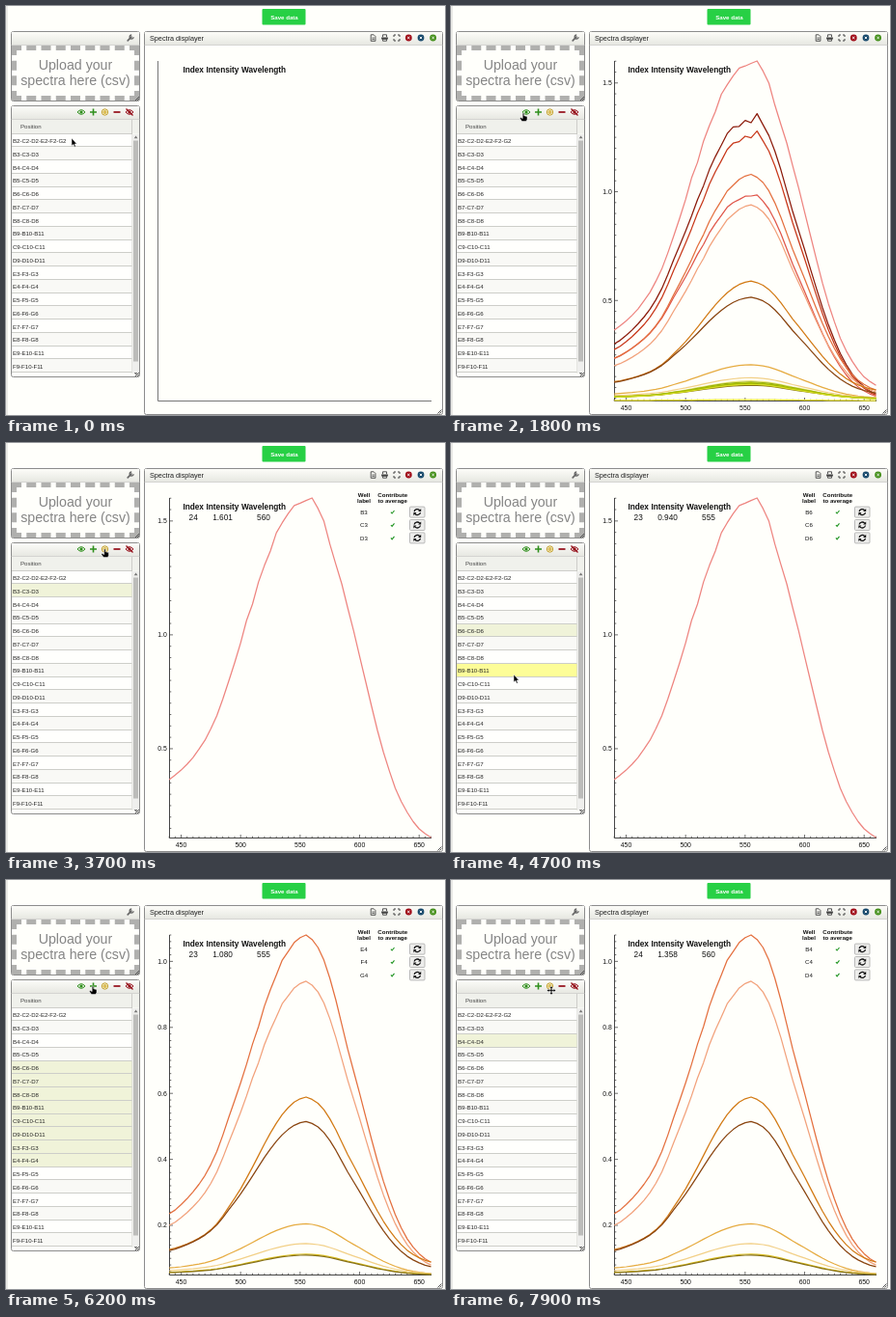
Write an HTML page that moves like this. It is 455 by 424 pixels and loops after 8000 ms.

```html
<!DOCTYPE html>
<html lang="en">
<head>
<meta charset="utf-8">
<title>Spectra displayer</title>
<style>
html, body { margin: 0; width: 100%; height: 100%; overflow: hidden; background: #fffffb; }
svg { display: block; width: 455px; height: 424px; font-family: "Liberation Sans", Arial, sans-serif; }
</style>
</head>
<body>
<svg id="stage" viewBox="0 0 455 424">
  <defs>
    <linearGradient id="bar" x2="0" y2="1"><stop stop-color="#fcfcf8"/><stop offset="1" stop-color="#e6e7e1"/></linearGradient>
  </defs>
  <g id="page"></g>
  <g id="live"></g>
</svg>
<script>
const $ = id => document.getElementById(id);
const rect = (x, y, w, h, fill, more = '') => `<rect x="${x}" y="${y}" width="${w}" height="${h}" fill="${fill}" ${more}/>`;
const line = (d, stroke, width = 1, more = '') => `<path d="${d}" fill="none" stroke="${stroke}" stroke-width="${width}" ${more}/>`;
const shape = (d, fill, more = '') => `<path d="${d}" fill="${fill}" ${more}/>`;
const at = (x, y, body) => `<g transform="translate(${x} ${y})">${body}</g>`;
const text = (x, y, size, s, { fill = '#111', anchor = 'start', bold = false } = {}) =>
  `<text x="${x}" y="${y}" font-size="${size}" fill="${fill}" text-anchor="${anchor}"${bold ? ' font-weight="bold"' : ''}>${s}</text>`;
const mid = { anchor: 'middle' };
const midBold = { anchor: 'middle', bold: true };

const ROWS = ['B2-C2-D2-E2-F2-G2', 'B3-C3-D3', 'B4-C4-D4', 'B5-C5-D5', 'B6-C6-D6', 'B7-C7-D7', 'B8-C8-D8',
  'B9-B10-B11', 'C9-C10-C11', 'D9-D10-D11', 'E3-F3-G3', 'E4-F4-G4', 'E5-F5-G5', 'E6-F6-G6', 'E7-F7-G7',
  'E8-F8-G8', 'E9-E10-E11', 'F9-F10-F11'];
const ROW_TOP = 132.7, ROW_H = 13.75;

// ---- Spectra: 45 samples, 440 to 660 nm ----
const BELL = [.148, .176, .215, .265, .338, .442, .548, .664, .78, .88, .952, .992, .986, .923, .801, .651,
  .516, .375, .247, .145, .071, .026, 0];
const NOTCH = { 21: -.03, 22: -.02, 23: -.04, 24: .02 };
const TALLEST = [364, 384, 406, 432, 461, 498, 537, 588, 645, 718, 796, 878, 965, 1063, 1135, 1232, 1304, 1368,
  1448, 1492, 1533, 1568, 1578, 1590, 1601, 1555, 1499, 1398, 1309, 1224, 1118, 1016, 906, 796, 686, 580, 485,
  402, 326, 268, 220, 180, 148, 127, 110].map(v => v / 1000);

function bell(i) {
  if (i === 23) return 1;
  const k = i >> 1;
  if (i % 2 === 0) return BELL[k];
  const b = n => BELL[Math.max(0, Math.min(22, n))];
  return Math.max(0, (9 * (b(k) + b(k + 1)) - b(k - 1) - b(k + 2)) / 16);
}

function spectrum(peak, end, skew, notch = 0) {
  return Array.from({ length: 45 }, (_, i) => {
    const s = bell(i) ** (i < 23 ? skew : 1);
    const wobble = peak > .9 && i > 12 && i < 21 ? .003 * peak * Math.sin(i * 2.4) : 0;
    return end + (peak - end) * s + wobble + notch * (NOTCH[i] || 0);
  });
}

const CURVES = [
  ['#ee8580', TALLEST],
  ['#8b1a0a', spectrum(1.357, .07, .9, 1)],
  ['#c8381a', spectrum(1.28, .065, .92, .8)],
  ['#e0564a', spectrum(.992, .06, .88, .3)],
  ['#e4703f', spectrum(1.08, .0885, 1)],
  ['#f2a27c', spectrum(.94, .08, 1.03)],
  ['#d27a14', spectrum(.589, .089, 1.35)],
  ['#8a4510', spectrum(.515, .075, 1.15)],
  ['#e6ac42', spectrum(.205, .054, 1.15)],
  ['#f2d088', spectrum(.145, .054, 1.2)],
  ['#dcc020', spectrum(.113, .052, 1.2)],
  ['#86701a', spectrum(.11, .051, 1.2)],
  ['#ece87a', spectrum(.13, .05, 1.2)],
  ['#8fa610', spectrum(.125, .05, 1.2)],
  ['#b4c800', spectrum(.121, .05, 1.2)],
  ['#9cb400', spectrum(.118, .05, 1.2)],
  ['#d4dc20', spectrum(.114, .049, 1.2)],
  ['#f0e830', spectrum(.044, .04, 1)]
];

const px = nm => 181.5 + (nm - 450) * 1.2335;

function chart(curves) {
  if (!curves) return line('M157.5 57V409.5H441', '#777');
  const all = curves.flatMap(c => c[1]);
  const lo = Math.min(...all), hi = Math.max(...all);
  const py = v => 57 + (hi - v) / (hi - lo) * 352;
  const step = hi - lo > 1.2 ? .5 : .2;
  let ticks = '', labels = '';
  for (let n = Math.ceil(lo / step * 10); n * step / 10 <= hi; n++) {
    const y = py(n * step / 10), major = n % 10 === 0;
    ticks += `M169.5 ${y}h${major ? 3.5 : 1.8}`;
    if (major) labels += text(166.8, y + 2.4, 6.9, (n * step / 10).toFixed(1), { anchor: 'end' });
  }
  for (let nm = 440; nm <= 660; nm += 5) {
    const major = nm % 50 === 0;
    ticks += `M${px(nm)} 409.5v${major ? -3.5 : -1.8}`;
    if (major) labels += text(px(nm), 418.6, 6.9, nm, mid);
  }
  const paths = curves.map(([color, data]) =>
    line('M' + data.map((v, i) => `${px(440 + i * 5).toFixed(1)} ${py(v).toFixed(1)}`).join('L'), color, 1.25, 'stroke-linejoin="round"'));
  return line('M169.5 57V409.5H441', '#333', .9) + line(ticks, '#333', .7) + labels + paths.join('');
}

// ---- Static page ----
const panel = (x, y, w, h) => rect(x, y, w, h, '#fffffb', 'rx="2" stroke="#8c8c8c"') +
  rect(x + .5, y + .5, w - 1, 13.5, 'url(#bar)') + line(`M${x} ${y + 14}h${w}`, '#c8c8c4', .7);
const grip = (x, y) => line(`M${x - 4} ${y}l4-4M${x - 2} ${y}l2-2`, '#444', .9);
const eye = c => line('M-4 0Q0-4.6 4 0Q0 4.6-4 0z', c, 1) + `<circle r="1.6" fill="${c}"/>`;
const closer = c => `<circle r="3.4" fill="${c}"/>` + line('M-1.2-1.2l2.4 2.4M1.2-1.2l-2.4 2.4', '#fff', .9);
const RED = '#940c18', GREEN = '#2f8f1c';

$('page').innerHTML = [
  rect(0, 0, 455, 424, '#fffffb'),
  line('M1 0V424', '#dddddb', 1.2),
  rect(265.5, 3, 45, 16.5, '#27d045', 'rx="1"'),
  text(288.5, 13.6, 6.1, 'Save data', { ...midBold, fill: '#fff' }),

  panel(5.5, 26.5, 133, 72),
  at(129, 33, line('M-2.8 2.8L1 -1', '#666', 1.7, 'stroke-linecap="round"') + line('M1.2-3A2 2 0 1 0 3.2-.8', '#666', 1.4)),
  line('M6 43.5H138M6 95.5H138', '#b0b0ae', 5, 'stroke-dasharray="10 5.25"'),
  line('M8.5 41V98M135.5 41V98', '#b0b0ae', 5, 'stroke-dasharray="10 5.67"'),
  text(72, 66.2, 14.2, 'Upload your', { ...mid, fill: '#858585' }),
  text(72, 82.2, 14.2, 'spectra here (csv)', { ...mid, fill: '#858585' }),
  grip(138, 98),

  panel(5.5, 103.5, 133, 281),
  at(78, 110, eye(GREEN)),
  line('M87 110h7M90.5 106.5v7', GREEN, 1.6),
  `<circle cx="102.5" cy="110" r="3.2" fill="#fbf3cc" stroke="#c2a030" stroke-width="1"/><circle cx="102.5" cy="110" r="1.5" fill="#e6c860" stroke="#c2a030" stroke-width=".7"/>`,
  line('M111.5 110h7', RED, 1.7),
  at(128, 110, eye(RED) + line('M-3.5-3.5l7 7', RED, 1.2)),
  rect(6, 118, 132, 14.5, '#f0f1ec'),
  line('M6 132.5H131M130.5 118V380.5', '#c4c5c0', .8),
  text(15, 126.8, 6.05, 'Position', { fill: '#444' }),
  rect(131, 133, 7, 247.5, '#efefed'),
  shape('M132.7 137.2h3.8l-1.9-2.6z', '#777'),
  shape('M132.7 380h3.8l-1.9 2.6z', '#777'),
  rect(132, 139.5, 5, 229, '#bcbcba'),
  grip(138, 384),

  panel(143.5, 26.5, 309, 397),
  text(149, 36, 7.25, 'Spectra displayer', { fill: '#222' }),
  at(380.5, 33, line('M-2.3-3.2h3l1.7 1.7v4.8h-4.7zM-1 0h2.2M-1 1.6h2.2', '#444', .9)),
  at(392.5, 33, line('M-2-.8v-2.4h4v2.4M-2 1.2v2h4v-2z', '#444', .9) + line('M-3.4 .5h6.8', '#444', 2)),
  at(405, 33, line('M-3-1v-2h2M1-3h2v2M3 1v2h-2M-1 3h-2v-2', '#444', 1)),
  at(417.3, 33, closer('#a00c18')), at(430, 33, closer('#184a6c')), at(442.6, 33, closer('#45901c')),
  grip(451.5, 422.5)
].join('');

// ---- Moving parts ----
const POINTER = [[0, 68, 137], [200, 68, 137], [700, 77, 112], [900, 75, 111], [2000, 75, 111], [2500, 82, 159],
  [2800, 82, 159], [3300, 103, 113], [3400, 102.5, 110], [3800, 102.5, 110], [4300, 60, 195], [4500, 60, 195],
  [4900, 70, 285], [5000, 70, 285], [5300, 102.5, 110], [5400, 102.5, 110], [5500, 117, 113], [5800, 90, 110],
  [6200, 90, 110], [6800, 105, 167.5], [7300, 105, 167.5], [7800, 104, 114.5], [8000, 104, 114.5]];

const EVENTS = [
  [0, { curves: null, rows: null, values: null }],
  [1300, { curves: CURVES }],
  [2600, { rows: [1, 1], values: [24, '1.601', 560] }],
  [3600, { curves: CURVES.slice(0, 1) }],
  [4400, { rows: [4, 4], values: [23, '0.940', 555] }],
  [5000, { rows: [4, 11], values: [23, '1.080', 555] }],
  [5400, { curves: CURVES.slice(4, 5) }],
  [5900, { curves: CURVES.slice(4, 12) }],
  [7200, { rows: [2, 2], values: [24, '1.358', 560] }]
];

function pointerAt(t) {
  const n = POINTER.findIndex(k => k[0] > t);
  const [t0, x0, y0] = POINTER[n - 1], [t1, x1, y1] = POINTER[n];
  const u = (t - t0) / (t1 - t0), e = u * u * (3 - 2 * u);
  return [x0 + (x1 - x0) * e, y0 + (y1 - y0) * e];
}

const OUTLINE = 'stroke="#fff" stroke-width=".5"';
const ARROW = shape('M0 0v8l1.8-1.6 1.3 2.8 1.2-.6-1.2-2.6h2.3z', '#000', OUTLINE);
const HAND = shape('M-.8 0h1.6v2.8l3.2 .8v3l-1 2h-4.4l-2.2-3 .8-1 2 1z', '#000', OUTLINE);
const MOVE = shape('M0-4.6l2 2.2h-1.2v1.6h1.6v-1.2l2.2 2-2.2 2v-1.2h-1.6v1.6h1.2l-2 2.2-2-2.2h1.2v-1.6h-1.6v1.2l-2.2-2 2.2-2v1.2h1.6v-1.6h-1.2z', '#111', OUTLINE);

function pointer(x, y) {
  const overBar = y > 104 && y < 118;
  return at(x, y, !overBar ? ARROW : y <= 111.5 ? HAND : MOVE);
}

function list(sel, hover) {
  return ROWS.map((name, i) => {
    const y = ROW_TOP + i * ROW_H;
    const top = Math.round(y), bottom = Math.round(y + ROW_H);
    const picked = sel && i >= sel[0] && i <= sel[1];
    const fill = i === hover ? '#fdfd98' : picked ? '#f0f3d9' : i % 2 ? '#f9f9f6' : '#fffffd';
    return rect(6, top, 124.5, bottom - top, fill) + rect(6, bottom - 1, 124.5, 1, '#cdcec9') +
      text(7, y + 9.4, 6.05, name, { fill: '#222' });
  }).join('');
}

const REFRESH = line('M-3.2-.5A3.2 3 0 0 1 2.4-1.9M3.2 .5A3.2 3 0 0 1-2.4 1.9', '#111', 1.3) +
  shape('M3.9-3.6v3.1h-3.1zM-3.9 3.6v-3.1h3.1z', '#111');

function details(sel, values) {
  const heads = [['Index', 194.2, 0], ['Intensity', 224.5, 1], ['Wavelength', 267, 2]];
  let out = heads.map(([s, x]) => text(x, 68.6, 8.25, s, midBold)).join('');
  if (!values) return out;
  out += heads.map(([, x, i]) => text(x, 80.2, 8.25, values[i], mid)).join('');
  out += text(371, 55.6, 6.1, 'Well', midBold) + text(371, 62.2, 6.1, 'label', midBold) +
    text(400.7, 55.6, 6.1, 'Contribute', midBold) + text(400.7, 62.2, 6.1, 'to average', midBold);
  ROWS[sel[1]].split('-').forEach((well, i) => {
    const y = 71.6 + i * 13.4;
    out += text(371, y + 2.1, 6.1, well, mid) + line(`M398.9 ${y}l1.2 1.4 2.4-3`, '#1f9420', 1.1) +
      rect(418.5, y - 5.5, 15.5, 11, '#eeeeec', 'rx="1" stroke="#aaa" stroke-width=".8"') + at(426.3, y, REFRESH);
  });
  return out;
}

function draw(t) {
  const state = Object.assign({}, ...EVENTS.filter(e => e[0] <= t).map(e => e[1]));
  const [x, y] = pointerAt(t);
  const hover = t >= 100 && y >= ROW_TOP ? Math.floor((y - ROW_TOP) / ROW_H) : -1;
  $('live').innerHTML = list(state.rows, hover) + chart(state.curves) + details(state.rows, state.values) + pointer(x, y);
}

const start = performance.now();
let shown = -1;
function tick() {
  const t = Math.floor((performance.now() - start) % 8000 / 100) * 100;
  if (t !== shown) draw(shown = t);
  requestAnimationFrame(tick);
}
tick();
</script>
</body>
</html>
```
